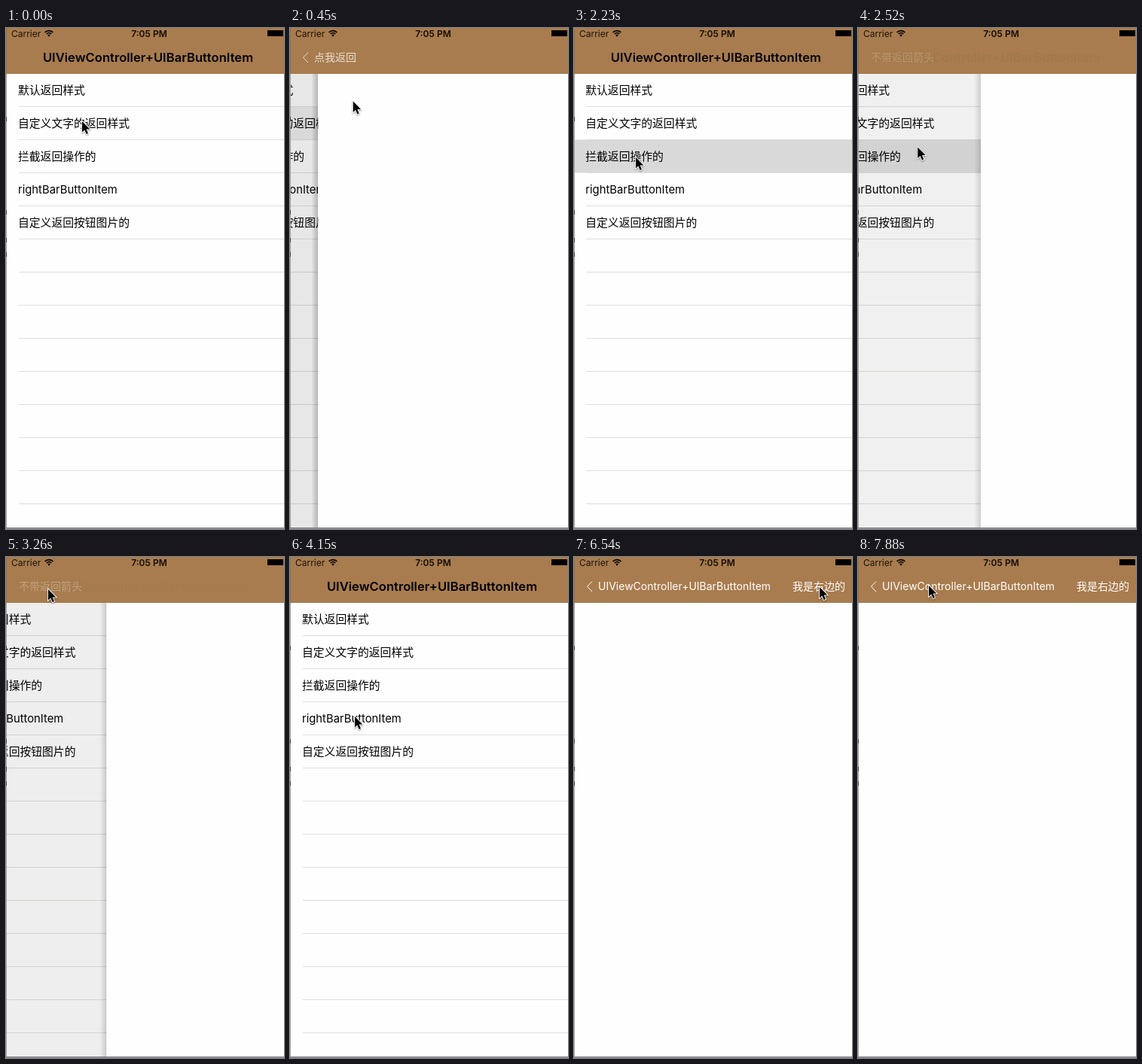
Write an HTML page with a canvas that moves like this. It is 369 by 666 pixels and loops after 8 s.

```html
<!DOCTYPE html>
<html lang="zh">
<head>
<meta charset="utf-8">
<title>Navigation demo</title>
<style>
  html, body { margin: 0; width: 100%; height: 100%; overflow: hidden; background: #fefefe; }
  canvas { display: block; }
</style>
</head>
<body>
<canvas id="stage" width="369" height="666"></canvas>
<script>
const ctx = document.getElementById('stage').getContext('2d');
const LOOP = 8000, STEP = 147;
const WIDTH = 369, SCREEN = 372, BOTTOM = 664, BAR = 61, ROW = 44;
const FONT = 'Inter, "Noto Sans CJK SC", "Noto Sans CJK", sans-serif';
const TITLE = 'UIViewController+UIBarButtonItem';
const ROWS = ['默认返回样式', '自定义文字的返回样式', '拦截返回操作的', 'rightBarButtonItem', '自定义返回按钮图片的'];

const CUSTOM = { row: 1, back: '点我返回', arrow: true };
const PLAIN = { row: 2, back: '不带返回箭头' };
const SIDES = { row: 3, back: TITLE, arrow: true, right: '我是右边的' };

// Each action refreshes the screen `steps` times while the pointer travels to `tip`.
// `lead` is how long a push or pop has been running at its first refresh.
const ACTIONS = [
  { at: 0, steps: 1, tip: [101, 124] },
  { at: 150, steps: 6, tip: [52, 49], push: CUSTOM, lead: 30 },
  { at: 1180, steps: 6, tip: [82, 172], pop: CUSTOM, lead: 61 },
  { at: 2230, steps: 6, tip: [56, 43], push: PLAIN, lead: 10 },
  { at: 3260, steps: 7, tip: [86, 212], pop: PLAIN, lead: 105 },
  { at: 4450, steps: 6, tip: [61, 62], push: SIDES, lead: 30 },
  { at: 5790, steps: 6, tip: [326, 40] },
  { at: 6990, steps: 2, tip: [326, 40], press: true },
  { at: 7440, steps: 2, tip: [158, 46] },
  { at: 7880, steps: 1, tip: [94, 38] }
];

const smooth = k => k * k * (3 - 2 * k);

function spring(ms) {
  const u = ms * 0.012, k = 1 - (1 + u) * Math.exp(-u);
  return k > 0.995 ? 1 : k;
}

function rect(x, y, w, h, color) {
  ctx.fillStyle = color;
  ctx.fillRect(x, y, w, h);
}

function label(text, x, y, size, color, weight = 400, align = 'left') {
  ctx.font = `${weight} ${size}px ${FONT}`;
  ctx.textAlign = align;
  ctx.fillStyle = color;
  ctx.fillText(text, x, y);
}

function path(points, close) {
  ctx.beginPath();
  points.forEach(([x, y]) => ctx.lineTo(x, y));
  if (close) ctx.closePath();
}

function drawList(shift, row, glow) {
  ctx.save();
  ctx.translate(shift, 0);
  if (glow > 0) rect(0, 60.5 + row * ROW, SCREEN, ROW, `rgba(217,217,217,${glow})`);
  for (let y = 104; y < BOTTOM; y += ROW) rect(17, y, SCREEN, 1, '#dfdfe1');
  ROWS.forEach((text, i) => label(text, 16, 88 + i * ROW, 14.8, '#000'));
  ctx.restore();
}

function drawPage(x, shown) {
  rect(0, BAR, x, BOTTOM - BAR, `rgba(0,0,0,${0.1 * shown})`);
  const shadow = ctx.createLinearGradient(x - 9, 0, x, 0);
  shadow.addColorStop(0, 'rgba(0,0,0,0)');
  shadow.addColorStop(1, `rgba(0,0,0,${0.25 * shown})`);
  if (x > 0) rect(x - 9, BAR, 9, BOTTOM - BAR, shadow);
  rect(x, BAR, WIDTH, BOTTOM - BAR, '#fefefe');
}

function drawStatus() {
  label('Carrier', 7, 11.5, 12, '#1c130a');
  label('7:05 PM', 190, 11.5, 12, '#120c06', 600, 'center');
  ctx.strokeStyle = ctx.fillStyle = '#0c0804';
  ctx.lineWidth = 1.7;
  for (const r of [4.4, 7.4]) {
    ctx.beginPath();
    ctx.arc(57, 11, r, -Math.PI * 0.76, -Math.PI * 0.24);
    ctx.stroke();
  }
  ctx.beginPath();
  ctx.moveTo(57, 11.8);
  ctx.arc(57, 11, 2.3, -Math.PI * 0.78, -Math.PI * 0.22);
  ctx.fill();
  rect(347, 3, 21, 8, '#000');
}

function drawBar(page, shown, pressed) {
  rect(0, 0, WIDTH, BAR, '#a87c4e');
  drawStatus();
  ctx.globalAlpha = (1 - shown) ** 4;
  label(TITLE, 188.5 - 12 * shown, 45, 16.6, '#000', 600, 'center');
  ctx.globalAlpha = shown ** 2.8;
  if (page.arrow) {
    ctx.strokeStyle = '#fff';
    ctx.lineWidth = 1;
    path([[24, 32.5], [17.5, 39.2], [24, 46]]);
    ctx.stroke();
  }
  label(page.back, page.arrow ? 32 : 17, 44, 14, '#fff');
  if (pressed) ctx.globalAlpha *= 0.3;
  if (page.right) label(page.right, 290, 44, 14, '#fff');
  ctx.globalAlpha = 1;
}

// Slivers of the desktop behind the window
function drawEdges() {
  rect(0, 0, 1, BOTTOM, '#a5a5a5');
  rect(0, 0, 1, BAR, '#8f7150');
  for (const y of [118, 242, 279, 298]) rect(0, y, 1, 6, '#444');
  rect(0, BOTTOM, WIDTH, 1, '#7c7c7c');
  rect(0, BOTTOM + 1, WIDTH, 1, '#9a9a9a');
}

function drawPointer(x, y) {
  ctx.save();
  ctx.translate(x, y);
  path([[0, 0], [0, 14.5], [3.3, 11.5], [5.7, 17], [8, 16], [5.6, 10.6], [10.3, 10.5]], true);
  ctx.shadowColor = 'rgba(0,0,0,.4)';
  ctx.shadowBlur = 2;
  ctx.shadowOffsetY = 1;
  ctx.lineWidth = 1.8;
  ctx.strokeStyle = '#fff';
  ctx.stroke();
  ctx.shadowColor = 'transparent';
  ctx.fillStyle = '#000';
  ctx.fill();
  ctx.restore();
}

function draw(now) {
  const past = ACTIONS.filter(a => a.at <= now);
  const action = past[past.length - 1], previous = past[past.length - 2] || action;
  const step = Math.min(action.steps - 1, Math.floor((now - action.at) / STEP));
  const time = action.at + step * STEP;

  const turn = past.filter(a => a.push || a.pop).pop();
  const page = turn ? turn.push || turn.pop : CUSTOM;
  const age = turn ? time - turn.at + turn.lead : 0;
  const k = spring(age), shown = turn && turn.pop ? 1 - k : k;
  const glow = turn && turn.push ? Math.min(1, Math.max(0, (500 - age) / 400)) : 0;

  // Navigation starts with the pointer still at rest; plain moves are already under way.
  const ahead = action === turn ? 0 : 1;
  const travel = smooth((step + ahead) / (action.steps - 1 + ahead));
  const tip = previous.tip.map((from, i) => from + (action.tip[i] - from) * travel);

  rect(0, 0, WIDTH, 666, '#fefefe');
  drawList(-0.3 * SCREEN * shown, page.row, glow);
  if (shown > 0) drawPage(SCREEN * (1 - shown), shown);
  drawBar(page, shown, action.press && step === 0);
  drawEdges();
  drawPointer(...tip);
}

function frame() {
  draw(performance.now() % LOOP);
  requestAnimationFrame(frame);
}
frame();
</script>
</body>
</html>
```
